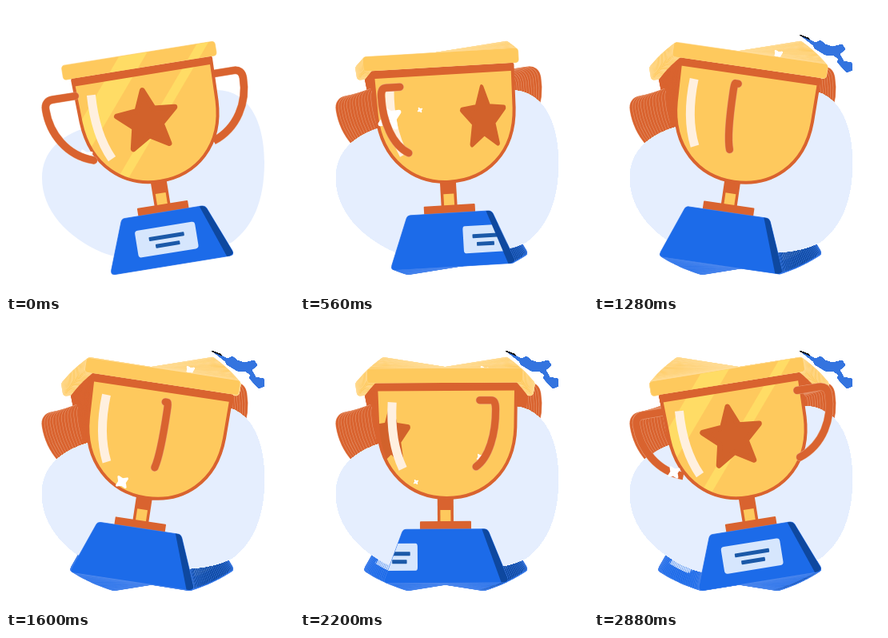
Recreate the animation shown at these times as an HTML page with a canvas. Size 360 by 360 pixels, loop 2920 ms.

```html
<!DOCTYPE html>
<html lang="en">
<head>
<meta charset="utf-8">
<title>Spinning trophy</title>
<style>
  html, body { margin: 0; width: 100%; height: 100%; overflow: hidden; background: #fff; }
  canvas { display: block; width: 360px; height: 360px; }
</style>
</head>
<body>
<canvas id="stage" width="360" height="360"></canvas>
<script>
const ctx = document.getElementById('stage').getContext('2d');
const LOOP = 2920, STEP = 40;
const GOLD = '#fec95d', SHINE = '#ffe067', RUST = '#d9632f', BLUE = '#1c6be9', NAVY = '#0e489f';

const blob = new Path2D('M45 215C45 182 68 162 100 152C160 130 200 105 262 105C308 105 323 152 323 195C323 245 308 276 283 295C266 304 248 307 232 308C190 318 150 320 120 308C76 289 45 255 45 215Z');
const cup = new Path2D('M-86-84L-84-30C-81 26-43 58 2 58C48 58 86 27 88-30L89-84Z');
const base = new Path2D('M-49 97H48Q52 97 54 101L77 158Q79 164 73 164H-72Q-78 164-76 158L-54.500 101Q-53 97-49 97Z');
const side = new Path2D('M45 96H55L80 160L70 166Z');
const glint = new Path2D('M-66-62Q-69-13-53 21');
const rim = new Path2D();
rim.roundRect(-97, -104, 194, 18, 4);
const body = new Path2D(cup);
body.addPath(rim);

// Each sparkle: x, y, peak radius, peak time, half of its life
const sparkles = [
  [100, 188, 10, 0, 140],
  [112, 140, 17, 560, 260],
  [150, 130, 4, 580, 100],
  [230, 61, 7, 1060, 290],
  [145, 200, 32, 1880, 345],
  [225, 169, 5, 2200, 110],
  [252, 166, 20, 2600, 280]
];

function fill(path, color) {
  ctx.fillStyle = color;
  ctx.fill(path);
}

function stroke(path, color, width) {
  ctx.strokeStyle = color;
  ctx.lineWidth = width;
  ctx.stroke(path);
}

function box(x, y, w, h, r, color) {
  const p = new Path2D();
  p.roundRect(x, y, w, h, r);
  fill(p, color);
}

function scoped(draw, clip) {
  ctx.save();
  if (clip) ctx.clip(clip);
  draw();
  ctx.restore();
}

function handle(k) {
  const p = new Path2D();
  p.moveTo(86 * k, -64);
  p.lineTo(114 * k, -64);
  p.quadraticCurveTo(125 * k, -64, 125 * k, -53);
  p.bezierCurveTo(125 * k, -22, 108 * k, 8, 76 * k, 19);
  stroke(p, '#e79a74', 10);
  stroke(p, RUST, 9);
}

function star(x, squeeze) {
  const p = new Path2D();
  for (let i = 0; i < 10; i++) {
    const a = i * Math.PI / 5 - Math.PI / 2, r = i % 2 ? 18 : 39;
    p.lineTo(r * Math.cos(a), r * Math.sin(a));
  }
  p.closePath();
  scoped(() => {
    ctx.translate(x, -18.5);
    ctx.scale(squeeze, 1);
    fill(p, '#d2622b');
    stroke(p, '#d2622b', 7);
  });
}

function plate(x, squeeze) {
  scoped(() => {
    ctx.translate(x, 131.5);
    ctx.scale(squeeze, 1);
    box(-38.5, -17, 77, 34, 4, '#d6e6fd');
    box(-22, -6.5, 45, 5, 1, '#1b59a8');
    box(-15, 3.5, 31, 5, 1, '#1b59a8');
  }, base);
}

function sparkle([x, y, size, peak, half], t) {
  let d = Math.abs(t - peak);
  d = Math.min(d, LOOP - d);
  if (d >= half) return;
  const r = size * Math.cos(d / half * Math.PI / 2);
  const p = new Path2D();
  for (let i = 0; i < 8; i++) {
    const a = i * Math.PI / 4 + 1, q = r * (i % 2 ? 0.36 : 0.82);
    p.lineTo(x + q * Math.cos(a), y + q * Math.sin(a));
  }
  p.closePath();
  fill(p, '#fff');
  stroke(p, '#fff', r * 0.32);
}

// Diagonal light bands that cross the gold between two turns
function bands(t) {
  const dt = t > LOOP / 2 ? t - LOOP : t;
  const alpha = Math.min(1, (dt + 400) / 320, (440 - dt) / 240);
  if (alpha <= 0) return;
  scoped(() => {
    ctx.globalAlpha = alpha * 0.85;
    for (const [x, w] of [[-6, 36], [82, 15]]) {
      const p = new Path2D();
      const left = x + dt * 0.2 - w / 2;
      p.moveTo(left, -104);
      p.lineTo(left + w, -104);
      p.lineTo(left + w - 136, 60);
      p.lineTo(left - 136, 60);
      p.closePath();
      fill(p, SHINE);
    }
  }, body);
}

function ribbon() {
  fill(new Path2D('M257 36L268 40L272 46Z'), '#111');
  fill(new Path2D('M260 38L277 46L283 43L289 48L298 51L310 48L314 54L307 60L312 69L322 71L323 80L316 83L304 70L306 66L300 62L289 61L276 53L274 49Z'), '#3474df');
}

function scene(t) {
  const u = t / LOOP;
  const tilt = -9.1 * Math.cos(2 * Math.PI * u) - 0.1;
  const turn = 2 * u - 1;
  const shift = 266 * (u < 0.5 ? u : u - 1) - 2;
  const squeeze = Math.max(0.25, 1 - 0.006 * Math.abs(shift));

  fill(blob, '#e5eefe');
  if (t >= 640) ribbon();

  const pose = () => {
    ctx.translate(181.5, 162);
    ctx.rotate(tilt * Math.PI / 180);
  };

  scoped(() => {
    pose();
    handle(-turn);

    box(-10, 55, 20, 36, 0, RUST);
    box(-6.5, 73, 13, 15, 0, GOLD);
    box(-32, 87, 64, 12, 1, RUST);

    stroke(base, '#4f88ec', 1);
    fill(base, BLUE);
    plate(shift * 0.86, squeeze);
    scoped(() => fill(side, NAVY), base);

    fill(cup, GOLD);
    stroke(rim, '#ffdc98', 1.2);
    fill(rim, GOLD);
    bands(t);
    scoped(() => {
      star(shift, squeeze);
      box(-90, -86, 180, 10, 0, RUST);
    }, cup);
    scoped(() => {
      ctx.beginPath();
      ctx.rect(-100, -86, 200, 160);
      ctx.clip();
      stroke(cup, RUST, 4);
    });
    ctx.lineCap = 'butt';
    stroke(glint, '#fff0df', 11);
  });

  for (const s of sparkles) sparkle(s, t);

  scoped(() => {
    pose();
    ctx.lineCap = 'round';
    handle(turn);
  });
}

ctx.lineJoin = 'round';
let last = -1;

// Steps paint over one another, so the moving parts leave a trail until the loop restarts
function tick(now) {
  const step = Math.floor(now % LOOP / STEP);
  if (step < last) {
    ctx.clearRect(0, 0, 360, 360);
    last = -1;
  }
  while (last < step) scene(++last * STEP);
  requestAnimationFrame(tick);
}

tick(0);
</script>
</body>
</html>
```
